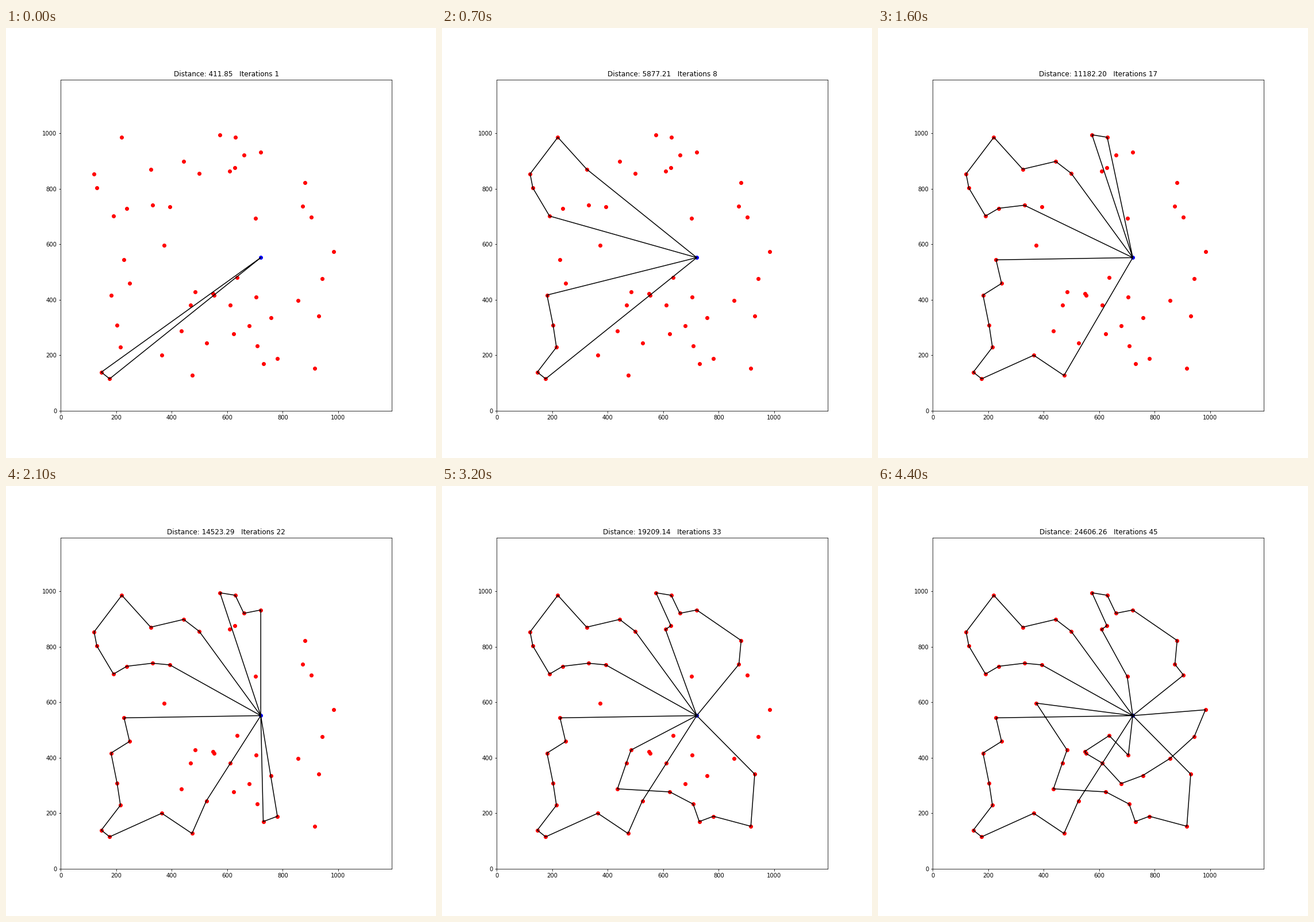
Write a matplotlib script that moves like this. It is 748 by 748 pixels and loops after 8.5 s.

```python
import numpy as np
import matplotlib.pyplot as plt
from matplotlib.animation import FuncAnimation

SIZE, DPI = 748, 72
FRAMES, INTERVAL = 85, 100
LIMIT = 1194
DEPOT = np.array([721, 552])

# Five delivery rounds of ten stops each, in visiting order
ROUTES = [np.array(r) for r in (
    [(499, 856), (443, 899), (324, 871), (220, 986), (120, 854),
     (130, 803), (190, 702), (238, 730), (330, 741), (393, 735)],
    [(228, 544), (248, 459), (181, 417), (203, 308), (215, 229),
     (146, 139), (176, 115), (364, 200), (473, 127), (525, 245)],
    [(701, 693), (608, 863), (628, 876), (574, 995), (629, 986),
     (660, 921), (721, 933), (881, 823), (873, 737), (904, 698)],
    [(373, 597), (484, 428), (467, 381), (435, 288), (624, 277),
     (708, 233), (730, 170), (781, 189), (916, 153), (930, 341)],
    [(983, 573), (943, 477), (856, 398), (757, 336), (679, 307),
     (611, 381), (552, 416), (548, 423), (636, 480), (705, 409)],
)]

# Counter readings by iteration
STEPS = [1, 8, 17, 26, 33, 38, 45]
TOTALS = [411.85, 5877.21, 11182.20, 17196.17, 19209.14, 23425.74, 24606.26]


def saving(a, b):
    """Length saved by linking two stops directly instead of via the depot."""
    dist = lambda p, q: np.hypot(*(p - q))
    return dist(a, DEPOT) + dist(b, DEPOT) - dist(a, b)


def merge_order():
    """Links (route, stop) sorted by falling saving."""
    links = [(r, i) for r, stops in enumerate(ROUTES) for i in range(len(stops) - 1)]
    return sorted(links, key=lambda l: -saving(*ROUTES[l[0]][l[1]:l[1] + 2]))


LINKS = merge_order()


def tour_path(n):
    """Polyline of all tours after n merges, with gaps between tours."""
    active = set(LINKS[:n])
    path = []
    for r, stops in enumerate(ROUTES):
        run = [stops[0]]
        for i in range(len(stops)):
            if (r, i) in active:
                run.append(stops[i + 1])
                continue
            if len(run) > 1:
                path += [DEPOT, *run, DEPOT, (np.nan, np.nan)]
            if i + 1 < len(stops):
                run = [stops[i + 1]]
    return np.array(path, dtype=float).T


plt.rcParams["font.family"] = "DejaVu Sans"
fig, ax = plt.subplots(figsize=(SIZE / DPI, SIZE / DPI), dpi=DPI)
ax.set_aspect("equal")
ax.set(xlim=(0, LIMIT), ylim=(0, LIMIT))
ax.scatter(*np.vstack(ROUTES).T, color="red")
ax.scatter(*DEPOT, color="blue")
tours, = ax.plot([], [], color="black", lw=1.5)
title = ax.set_title("")


def update(frame):
    n = min(frame + 1, len(LINKS))
    tours.set_data(*tour_path(n))
    title.set_text(f"Distance: {np.interp(n, STEPS, TOTALS):.2f}   Iterations {n}")
    return tours, title


anim = FuncAnimation(fig, update, frames=FRAMES, interval=INTERVAL,
                     repeat=True, repeat_delay=0, blit=False)
plt.show()
```
